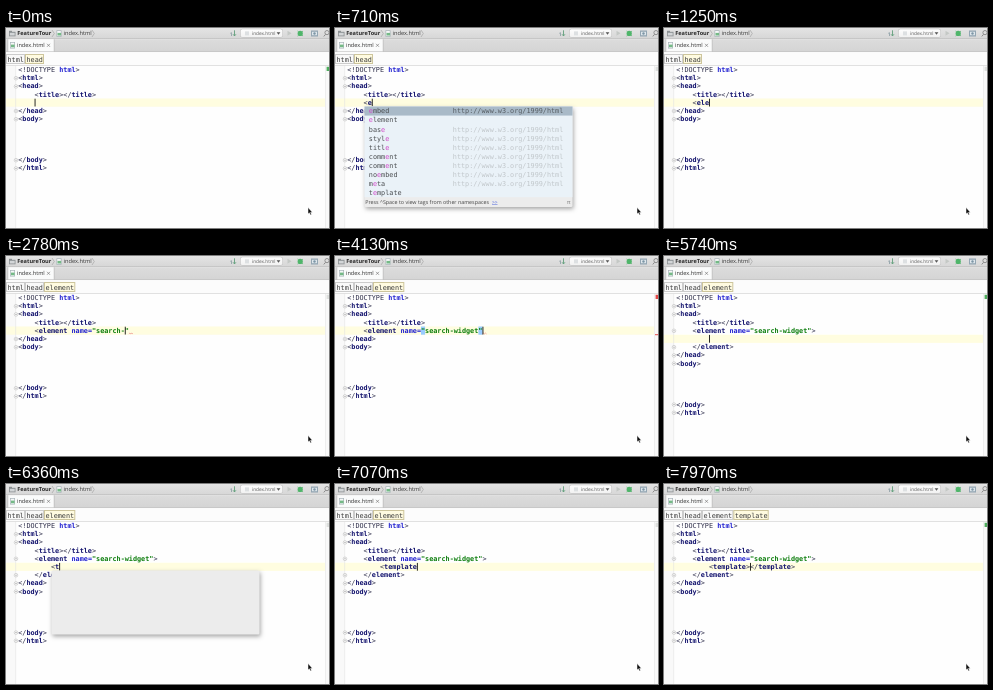
An HTML page with a canvas that plays this animation: 323x200 px, repeating every 8000 ms.

```html
<!DOCTYPE html>
<html lang="en">
<head>
<meta charset="utf-8">
<title>Editor completion</title>
<style>
html, body { margin: 0; width: 100%; height: 100%; overflow: hidden; background: #fff; }
canvas { display: block; width: 323px; height: 200px; }
</style>
</head>
<body>
<canvas id="stage"></canvas>
<script>
const W = 323, H = 200, LOOP = 8000;
const COL = 4.1, LINE = 8.2, ROW = 9.06, LEFT = 12.2;
const MONO = '"DejaVu Sans Mono", monospace', SANS = '"Open Sans", sans-serif';
const NAVY = '#14146e', BLUE = '#2020d0', INK = '#2c2c48';
const URL_NS = 'http://www.w3.org/1999/html';

const canvas = document.getElementById('stage');
const ctx = canvas.getContext('2d');
const dpr = window.devicePixelRatio || 1;
canvas.width = W * dpr;
canvas.height = H * dpr;
ctx.scale(dpr, dpr);
ctx.textRendering = 'geometricPrecision';

function rect(x, y, w, h, fill) {
  ctx.fillStyle = fill;
  ctx.fillRect(x, y, w, h);
}
function frame(x, y, w, h, color) {
  ctx.strokeStyle = color;
  ctx.lineWidth = 1;
  ctx.strokeRect(x, y, w, h);
}
function path(points, color, width, fill) {
  ctx.beginPath();
  points.forEach(([x, y], i) => i ? ctx.lineTo(x, y) : ctx.moveTo(x, y));
  if (fill) { ctx.closePath(); ctx.fillStyle = fill; ctx.fill(); }
  if (color) { ctx.strokeStyle = color; ctx.lineWidth = width; ctx.stroke(); }
}
function disc(x, y, r, fill, stroke, width) {
  ctx.beginPath();
  ctx.arc(x, y, r, 0, 7);
  if (fill) { ctx.fillStyle = fill; ctx.fill(); }
  if (stroke) { ctx.strokeStyle = stroke; ctx.lineWidth = width; ctx.stroke(); }
}
function rounded(x, y, w, h, r, fill) {
  ctx.beginPath();
  ctx.roundRect(x, y, w, h, r);
  ctx.fillStyle = fill;
  ctx.fill();
}
function text(str, x, y, color, size, face = SANS, weight = 400) {
  ctx.font = `${weight} ${size}px ${face}`;
  ctx.fillStyle = color;
  ctx.fillText(str, x, y);
}
function shade(y0, y1, a, b) {
  const g = ctx.createLinearGradient(0, y0, 0, y1);
  g.addColorStop(0, a);
  g.addColorStop(1, b);
  return g;
}

const HEAD_TAGS = ['base', 'element', 'link', 'meta', 'noscript', 'script', 'style', 'template', 'title', 'comment'];
const E_TAGS = ['embed', 'element', 'base', 'style', 'title', 'comment', 'comment', 'noembed', 'meta', 'template'];
const T_TAGS = ['template', 'title', 'style', 'meta', 'element', 'comment'];
const NO_NAMESPACE = ['element', 'template'];
const list = (items, match = '') => ({ items, match, h: items.length * ROW + 10 });
const blank = h => ({ items: null, h });

// Each step changes part of the editor state from its time on.
const steps = [
  [0, { typed: '', at: 0, caret: true, popup: null, mark: 'ok', quotes: false, squiggle: false, body: false, folds: false, crumbCount: 2 }],
  [90, { caret: false }],
  [440, { typed: '<', at: 1, caret: true, popup: blank(100), mark: 'busy' }],
  [530, { popup: list(HEAD_TAGS) }],
  [710, { typed: '<e', at: 2, popup: list(E_TAGS, 'e') }],
  [800, { typed: '<el', at: 3, popup: list(['element'], 'el') }],
  [890, { typed: '<ele', at: 4, popup: list(['element'], 'ele') }],
  [1250, { popup: null }],
  [1340, { typed: '<element name=""', at: 15 }],
  [1520, { crumbCount: 3 }],
  [1700, { squiggle: true, mark: 'error' }]
];
const keyTimes = [1970, 2060, 2150, 2240, 2420, 2510, 2780, 2960, 3050, 3230, 3410, 3500, 3590];
keyTimes.forEach((t, i) => steps.push([t, {
  typed: `<element name="${'search-widget'.slice(0, i + 1)}"`, at: 16 + i, mark: 'busy'
}]));
const WIDGET = '<element name="search-widget"';
steps.push(
  [3950, { mark: 'error' }],
  [4130, { at: 29, quotes: true }],
  [4310, { crumbCount: 2 }],
  [4400, { quotes: false }],
  [4670, { typed: WIDGET + '></element>', at: 30, squiggle: false, mark: 'busy' }],
  [4940, { crumbCount: 3 }],
  [5030, { mark: 'ok' }],
  [5390, { body: true, typed: '', at: 0, mark: 'busy' }],
  [5740, { folds: true, mark: 'ok' }],
  [6100, { typed: '<', at: 1, popup: blank(100), mark: 'busy' }],
  [6190, { popup: list(HEAD_TAGS) }],
  [6360, { typed: '<t', at: 2, popup: blank(64) }],
  [6450, { popup: list(T_TAGS, 't') }],
  [6530, { typed: '<te', at: 3, popup: list(['template'], 'te') }],
  [7070, { typed: '<template', at: 9, popup: null }],
  [7340, { typed: '<template>', at: 10 }],
  [7430, { typed: '<template></template>' }],
  [7610, { mark: 'error' }],
  [7790, { mark: 'busy' }],
  [7880, { crumbCount: 4 }],
  [7970, { mark: 'ok' }]
);

function stateAt(t) {
  const s = {};
  for (const [time, change] of steps) if (time <= t) Object.assign(s, change);
  return s;
}

function code(line, col, row) {
  const y = 44 + row * LINE;
  const token = /<!DOCTYPE|<\/?|>|"[^"]*"|[\w-]+|=/g;
  let hit, last = '';
  while ((hit = token.exec(line))) {
    const word = hit[0];
    let color = INK, weight = 400;
    if (word[0] === '"') { color = '#0b7d0b'; weight = 700; }
    else if (word === '=') { color = BLUE; weight = 700; }
    else if (/^\w/.test(word)) {
      color = last === '<' || last === '</' ? NAVY : BLUE;
      weight = 700;
    }
    text(word, LEFT + (col + hit.index) * COL, y, color, 6.8, MONO, weight);
    last = word;
  }
}

function fileIcon(x, y) {
  rect(x, y, 5, 6.5, '#a8b3b8');
  rect(x + .7, y + .7, 3.6, 5.1, '#f6f8f8');
  rect(x + 1, y + 2.6, 3.6, 2.6, '#74b986');
}

function chrome() {
  rect(0, 0, W, 11, shade(0, 11, '#e4e4e4', '#d6d6d6'));
  rect(0, 10.5, W, .7, '#b8b8b8');
  rect(3, 2.8, 3, 1.5, '#8b8f92');
  rect(3, 3.8, 6.5, 4.5, '#8b8f92');
  rect(3.8, 4.8, 4.9, 2.7, '#d3d6d8');
  text('FeatureTour', 11.2, 7.4, '#2a2a2a', 5.6, SANS, 700);
  path([[46, 2], [48.3, 5.5], [46, 9]], '#a5a5a5', .7);
  fileIcon(50.5, 2.3);
  text('index.html', 57.5, 7.4, '#3c3c3c', 5.7);
  path([[86, 2], [88.3, 5.5], [86, 9]], '#a5a5a5', .7);

  text('1', 223.8, 7.5, '#6b8590', 5, SANS, 600);
  path([[228.5, 2.3], [228.5, 8]], '#62a07c', .9);
  path([[227, 6.2], [228.5, 8], [230, 6.2]], '#62a07c', .8);
  rounded(234.2, .8, 42.6, 8.8, 2, '#c0c0c0');
  rounded(234.7, 1.3, 41.6, 7.8, 1.6, shade(0, 10, '#ffffff', '#f0f0f0'));
  rect(239, 3.4, 4, 4, '#dde0e2');
  text('index.html', 246, 7.2, '#5b5b5b', 4.75);
  path([[270.6, 4.3], [274.4, 4.3], [272.5, 6.8]], null, 0, '#555');
  path([[281.5, 2.8], [285.5, 5.2], [281.5, 7.7]], null, 0, '#c4c8c5');
  path([[291.5, 3], [297, 8]], '#58b070', .7);
  path([[297, 3], [291.5, 8]], '#58b070', .7);
  disc(294.2, 5.4, 2.6, '#4fb56a');
  rect(305, 2.5, 7, 6, '#93a6b3');
  rect(306, 3.8, 5, 3.4, '#dfe7ec');
  disc(308.5, 5.5, 1.2, '#7c95a5');
  disc(321, 4.6, 2.1, null, '#8a8a8a', .9);
  path([[319.6, 6.3], [317.8, 8.4]], '#8a8a8a', 1);

  rect(0, 11.2, W, 12.8, shade(11, 24, '#dcdcdc', '#d4d4d4'));
  rect(2, 11.2, 46, 13, '#fafbfb');
  rect(1.6, 11.2, .6, 12.6, '#b5b5b5');
  rect(47.8, 11.2, .6, 12.6, '#b5b5b5');
  fileIcon(4, 14);
  text('index.html', 11, 19.3, '#333', 5.6);
  path([[41, 15.8], [44, 18.8]], '#777', .7);
  path([[44, 15.8], [41, 18.8]], '#777', .7);
  rect(0, 23.4, W, .7, '#c0c0c0');
  rect(0, 24.1, W, 13.4, '#fcfcfc');
  rect(0, 37, W, .7, '#d6d6d6');
}

function crumbs(count) {
  let x = .5;
  ['html', 'head', 'element', 'template'].slice(0, count).forEach((name, i) => {
    const w = name.length * COL + 1.6, active = i === count - 1;
    rect(x, 26.5, w, 9, active ? '#fffbe0' : '#f9f9f9');
    frame(x, 26.5, w, 9, active ? '#cdc59c' : '#cccccc');
    text(name, x + 1, 33.6, '#3a3a3a', 6.8, MONO);
    x += w + 1;
  });
}

function fold(row) {
  const y = 42 + row * LINE;
  disc(10, y, 1.8, '#fff', '#bdbdbd', .6);
  path([[9, y], [11, y]], '#999', .6);
}

function editor(s) {
  const row = s.body ? 5 : 4, shift = s.body ? 2 : 0, indent = s.body ? 8 : 4;
  const top = 37.7 + row * LINE, x0 = LEFT + indent * COL;
  rect(0, 37.7, 9.5, H, '#f9f9f9');
  rect(0, top, 319, LINE, '#fffde0');
  rect(9.5, 37.7, .6, H, '#e2e2e2');
  rect(319, 37.7, 4, H, '#f9f9f9');
  rect(319, 37.7, .6, H, '#e6e6e6');

  if (s.quotes) for (const c of [14, 28]) rect(x0 + c * COL, top, COL, LINE, '#99ccff');

  code('<!DOCTYPE html>', 0, 0);
  code('<html>', 0, 1);
  code('<head>', 0, 2);
  code('<title></title>', 4, 3);
  if (s.body) {
    code(WIDGET + '>', 4, 4);
    code('</element>', 4, 6);
  }
  code(s.typed, indent, row);
  code('</head>', 0, 5 + shift);
  code('<body>', 0, 6 + shift);
  code('</body>', 0, 11 + shift);
  code('</html>', 0, 12 + shift);
  [1, 2].forEach(fold);
  [5, 6, 11, 12].forEach(r => fold(r + shift));
  if (s.folds) [4, 6].forEach(fold);

  if (s.squiggle) {
    const x = x0 + s.typed.length * COL, y = top + 7.4;
    path([[x, y], [x + 1, y - .8], [x + 2, y], [x + 3, y - .8], [x + 4, y]], '#e87878', .6);
  }
  if (s.caret) rect(x0 + s.at * COL, top + .2, .9, LINE - .4, '#111');

  const marks = { ok: '#4fae5e', error: '#e34848', busy: '#dcdedc' };
  rect(320.6, 38.8, 2.4, 4.2, marks[s.mark]);
  if (s.mark === 'error') rect(320, top + LINE - .5, 3, 1, '#e34848');
}

// Draws a name with the letters that match the typed prefix picked out.
function suggestion(name, match, x, y) {
  let next = 0;
  [...name].forEach((ch, i) => {
    const hit = ch === match[next];
    if (hit) next++;
    text(ch, x + i * COL, y, hit ? '#d048c8' : '#4a4d50', 6.8, MONO);
  });
}

function popup(p, body) {
  const x = body ? 45.5 : 29.5, y = body ? 86.5 : 78.5, w = 208;
  ctx.save();
  ctx.shadowColor = 'rgba(0,0,0,.35)';
  ctx.shadowBlur = 4 * dpr;
  ctx.shadowOffsetX = dpr;
  ctx.shadowOffsetY = 2 * dpr;
  rounded(x, y, w, p.h, 1.5, '#ececec');
  ctx.restore();
  if (!p.items) return;

  const listH = p.items.length * ROW;
  rect(x, y, w, listH, '#eaf2f8');
  rect(x, y, w, ROW, '#a9bac8');
  p.items.forEach((name, i) => {
    const base = y + i * ROW + 6.9;
    suggestion(name, p.match, x + 4.3, base);
    if (!NO_NAMESPACE.includes(name)) text(URL_NS, x + 88.3, base, i ? '#c0c6ca' : '#555c62', 6.8, MONO);
  });
  const base = y + listH + 6.8;
  text('Press ^Space to view tags from other namespaces', x + .8, base, '#444', 5.33);
  text('>>', x + 127.5, base, '#4a62dc', 5);
  rect(x + 127.5, base + .5, 5.5, .5, '#4a62dc');
  text('π', x + 202.5, base, '#777', 5.5);
}

function pointer() {
  path([[302, 179.4], [302, 186], [303.4, 184.8], [304.4, 187], [305.5, 186.5], [304.6, 184.4], [306.3, 184.2]], '#fff', .5, '#111');
}

function draw(now) {
  const s = stateAt(now % LOOP);
  rect(0, 0, W, H, '#fefefe');
  editor(s);
  chrome();
  crumbs(s.crumbCount);
  if (s.popup) popup(s.popup, s.body);
  pointer();
  requestAnimationFrame(draw);
}
requestAnimationFrame(draw);
</script>
</body>
</html>
```
